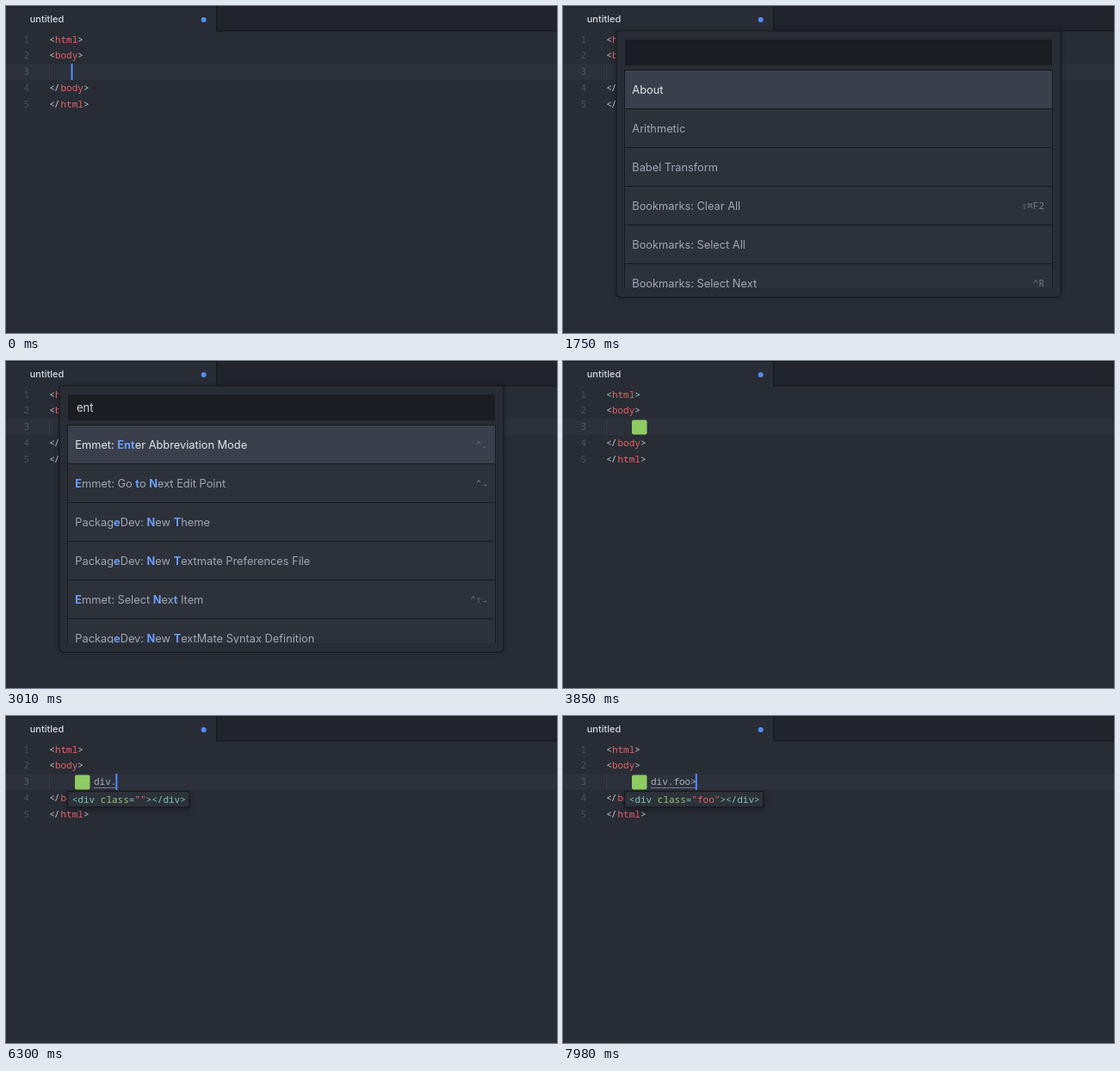
An HTML page with a canvas that plays this animation: 640 by 380 pixels, repeating every 8 s.

```html
<!DOCTYPE html>
<html lang="en">
<head>
<meta charset="utf-8">
<title>Editor abbreviation</title>
<style>
  html, body { margin: 0; width: 100%; height: 100%; overflow: hidden; background: #282c34; }
  canvas { display: block; width: 640px; height: 380px; }
</style>
</head>
<body>
<canvas id="stage" width="640" height="380"></canvas>
<script>
const ctx = document.getElementById('stage').getContext('2d');
const LOOP = 8000, BLINK = 400;
const OPEN = 1050, CLOSE = 3080;
const UI = 'Inter, "Open Sans", sans-serif';
const MONO = '11px "Noto Sans Mono", "DejaVu Sans Mono", monospace';
const CHAR = 6.6, LINE = 18.75;
const BG = '#282c34', EDGE = '#181a1f', TEXT = '#abb2bf', RED = '#e8606a';
const BLUE = '#528bff', MATCH = '#6c9cf5', TEAL = '#7cc5b8', GREEN = '#98c96f';

// Each key press: time and the text after it.
const QUERY = [[OPEN, ''], [1960, 'e'], [2100, 'en'], [2380, 'ent']];
const ABBR = [
  [CLOSE, ''], [4550, 'd'], [4690, 'di'], [4900, 'div'], [6020, 'div.'],
  [6500, 'div.f'], [6640, 'div.fo'], [6800, 'div.foo'], [7750, 'div.foo>']
];

// Asterisks enclose matched letters; the second entry is the shortcut.
const ALL = { top: 75, selected: 0, rows: [
  ['About'], ['Arithmetic'], ['Babel Transform'], ['Bookmarks: Clear All', '⇧⌘F2'],
  ['Bookmarks: Select All'], ['Bookmarks: Select Next', '⌃R']
] };
const SCROLLED = { top: 63, selected: 4, rows: [
  ['*E*mmet: Increment *N*umber by 1', '⌃↑'], ['*E*mmet: Increment *N*umber by 10'],
  ['*E*mmet: Decrement *N*umber by 0.1'], ['*E*mmet: Increment *N*umber by 0.1'],
  ['Emmet: *En*ter Abbreviation Mode', '⌃.'], ['HTML: *En*code Special Characters']
] };
const FILTERED = { top: 75, selected: 0, rows: [
  ['Emmet: *Ent*er Abbreviation Mode', '⌃.'], ['*E*mmet: Go *t*o *N*ext Edit Point', '⌃→'],
  ['Packag*e*Dev: *N*ew *T*heme'], ['Packag*e*Dev: *N*ew *T*extmate Preferences File'],
  ['*E*mmet: Select *N*ex*t* Item', '⌃⇧→'], ['Packag*e*Dev: *N*ew *T*extMate Syntax Definition']
] };
const LISTS = [ALL, SCROLLED, SCROLLED, FILTERED];

function rect(x, y, w, h, color) {
  ctx.fillStyle = color;
  ctx.fillRect(x, y, w, h);
}

function text(str, x, y, color, font, align = 'left') {
  ctx.font = font;
  ctx.fillStyle = color;
  ctx.textAlign = align;
  ctx.fillText(str, x, y);
  return ctx.measureText(str).width;
}

function code(parts, x, y) {
  for (const [str, color] of parts) {
    [...str].forEach((c, i) => text(c, x + i * CHAR, y, color, MONO));
    x += str.length * CHAR;
  }
}

function tag(name, closing, row) {
  const y = 42.5 + row * LINE;
  text('<', 50.3, y, '#bfc5cf', MONO);
  if (closing) text('/', 55.8, y, '#bfc5cf', MONO);
  code([[name, RED], ['>', '#bfc5cf']], closing ? 63.5 : 56.9, y);
}

function lastKey(keys, t) {
  let n = 0;
  while (n + 1 < keys.length && keys[n + 1][0] <= t) n++;
  return n;
}

const lit = (t, since) => Math.floor((t - since) / BLINK) % 2 === 0;

function caret(x, y, h) {
  rect(x, y, 2, h, BLUE);
}

function drawEditor() {
  rect(0, 0, 640, 380, BG);
  rect(244, 0, 396, 29, '#21252b');
  rect(244, 28, 396, 1.5, EDGE);
  rect(244, 0, 1.5, 29, EDGE);
  rect(0, 0, 640, 1, '#1d2026');
  text('untitled', 27.7, 19, '#d7dae0', '500 11px ' + UI);
  ctx.fillStyle = '#568af2';
  ctx.beginPath();
  ctx.arc(229.7, 16, 3, 0, Math.PI * 2);
  ctx.fill();

  rect(0, 67, 640, 19, '#2c313b');
  rect(50, 67, 1, 19, '#363b45');
  for (let i = 0; i < 5; i++) {
    text(i + 1, 27, 42.5 + i * LINE, i === 2 ? '#535a68' : '#495060', MONO, 'right');
  }
  tag('html', false, 0);
  tag('body', false, 1);
  tag('body', true, 3);
  tag('html', true, 4);
}

function drawPreview(abbr) {
  const [name, cls] = abbr.replace('>', '').split('.');
  const parts = [['<' + name, TEAL]];
  if (cls !== undefined) parts.push([' class', GREEN], ['=', TEAL], [`"${cls}"`, RED]);
  parts.push([`></${name}>`, TEAL]);
  const w = parts.reduce((sum, p) => sum + p[0].length, 0) * CHAR + 10.5;
  ctx.save();
  ctx.shadowColor = 'rgba(0,0,0,.35)';
  ctx.shadowBlur = 6;
  ctx.shadowOffsetY = 3;
  rect(71, 87, w, 19.5, EDGE);
  ctx.restore();
  rect(72.2, 88.2, w - 2.4, 17.1, '#2c313a');
  code(parts, 76.8, 100.5);
}

function drawAbbreviation(t) {
  const [since, abbr] = ABBR[lastKey(ABBR, t)];
  const w = abbr.length * CHAR;
  ctx.fillStyle = '#8fcb63';
  ctx.beginPath();
  ctx.roundRect(80, 68.5, 17.5, 17, 2);
  ctx.fill();
  code([[abbr, TEXT]], 102, 80);
  if (abbr) {
    rect(102, 83, w, 1, '#777e8b');
    drawPreview(abbr);
  }
  if (lit(t, since)) caret(101 + w, 67, 19);
}

function drawLabel(label, x, y, color) {
  label.split('*').forEach((part, i) => {
    const match = i % 2;
    x += text(part, x, y, match ? MATCH : color, (match ? '700' : '400') + ' 12.8px ' + UI);
  });
}

function drawList({ top, selected, rows }) {
  ctx.save();
  ctx.beginPath();
  ctx.rect(71, top < 75 ? 69 : 74, 498, 254 + (top < 75 ? 5 : 0));
  ctx.clip();
  rect(71, top - 1, 498, 260, EDGE);
  rows.forEach(([label, keys], i) => {
    const y = top + i * 45, on = i === selected;
    rect(72, y, 496, 44, on ? '#3a3f4b' : '#2c313a');
    drawLabel(label, 80.3, y + 26.6, on ? '#e2e5ea' : '#a0a7b4');
    if (keys) text(keys, 559, y + 26, '#737a87', MONO, 'right');
  });
  ctx.restore();
}

function drawPalette(t) {
  const n = lastKey(QUERY, t);
  const [since, query] = QUERY[n];
  ctx.save();
  ctx.shadowColor = 'rgba(0,0,0,.3)';
  ctx.shadowBlur = 6;
  ctx.fillStyle = BG;
  ctx.beginPath();
  ctx.roundRect(62, 29, 516, 309.5, [0, 0, 5, 5]);
  ctx.fill();
  ctx.restore();
  ctx.strokeStyle = EDGE;
  ctx.lineWidth = 1.2;
  ctx.stroke();
  rect(72, 39, 496, 30, '#1b1d23');
  drawList(LISTS[n]);
  const w = text(query, 82, 59, '#d7dae0', '400 13px ' + UI);
  if (lit(t, since)) caret(81.3 + w, 45, 19);
}

function draw(t) {
  drawEditor();
  if (t >= CLOSE) drawAbbreviation(t);
  else if (t >= OPEN) drawPalette(t);
  else if (lit(t, -50)) caret(75.5, 67, 19);
}

const start = performance.now();
function frame() {
  draw((performance.now() - start) % LOOP);
  requestAnimationFrame(frame);
}
frame();
</script>
</body>
</html>
```
